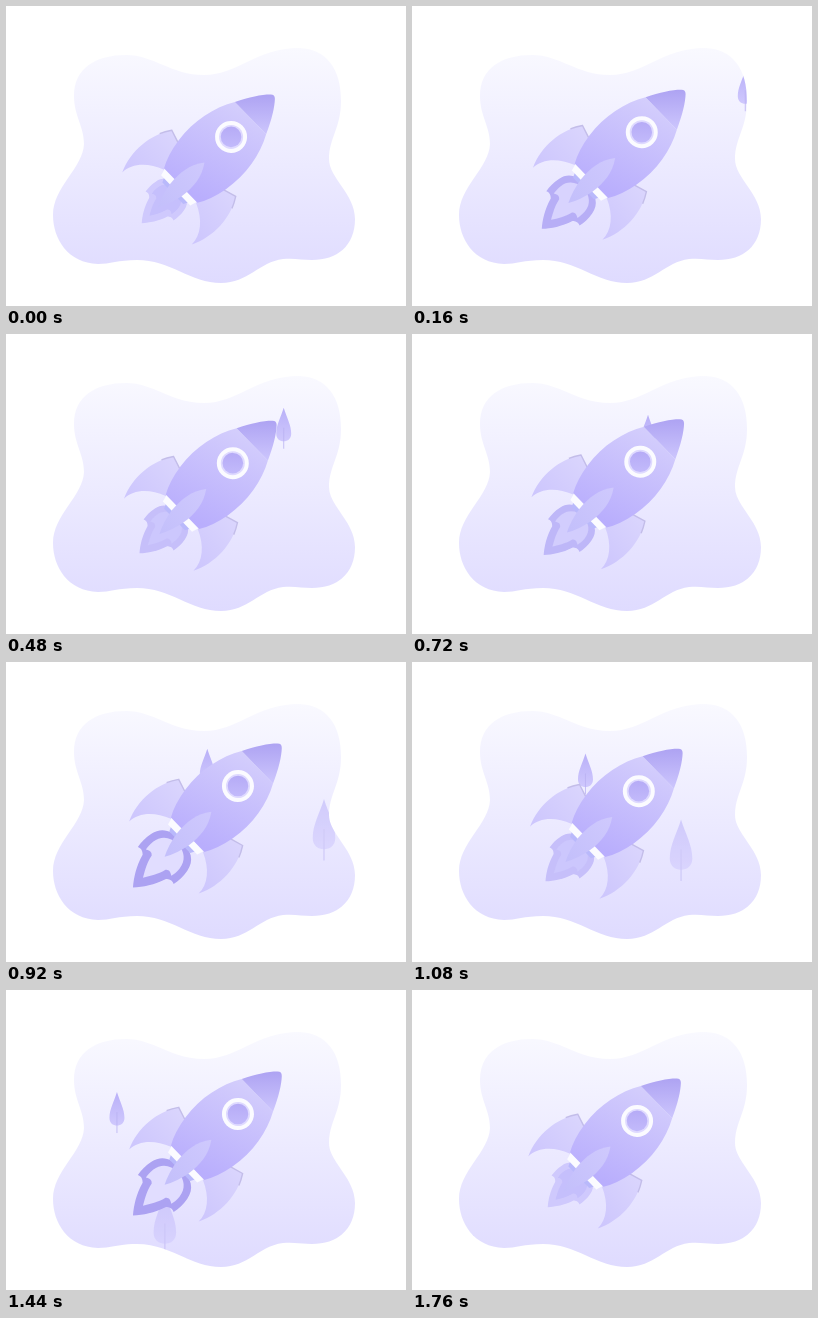
Write an HTML page that moves like this. It is 400 px wide and 300 px high and loops after 1.8 s.

```html
<!DOCTYPE html>
<html lang="en">
<head>
<meta charset="utf-8">
<title>Rocket</title>
<style>
  html, body { margin: 0; width: 100%; height: 100%; overflow: hidden; background: #fff; }
  svg { display: block; width: 100vw; height: 100vh; }
</style>
</head>
<body>
<svg viewBox="0 0 400 300">
  <defs>
    <linearGradient id="sky" x1="0" y1="0" x2="0" y2="1">
      <stop offset="0" stop-color="#f9f9ff"/><stop offset="1" stop-color="#dfdbff"/>
    </linearGradient>
    <linearGradient id="hull" gradientUnits="userSpaceOnUse" x1="-20" y1="-25" x2="14" y2="68">
      <stop offset="0" stop-color="#d3cdfc"/><stop offset="1" stop-color="#b9aefd"/>
    </linearGradient>
    <linearGradient id="cap" gradientUnits="userSpaceOnUse" x1="-8" y1="-56" x2="20" y2="-29">
      <stop offset="0" stop-color="#aca1f2"/><stop offset="1" stop-color="#cac3fc"/>
    </linearGradient>
    <linearGradient id="wing" x1="0" y1="0" x2="0" y2="1">
      <stop offset="0" stop-color="#dad5fd"/><stop offset="1" stop-color="#ccc5fd"/>
    </linearGradient>
    <linearGradient id="glass" x1="0" y1="0" x2="1" y2="1">
      <stop offset="0" stop-color="#b3a8f5"/><stop offset="1" stop-color="#c5bdfc"/>
    </linearGradient>
    <linearGradient id="keel" x1="0" y1="0" x2="0" y2="1">
      <stop offset="0" stop-color="#cfc9fd"/><stop offset="1" stop-color="#c3bffb"/>
    </linearGradient>
    <linearGradient id="foliage" x1="0" y1="0" x2="0" y2="1">
      <stop offset="0" stop-color="#b9b0f8"/><stop offset="1" stop-color="#cfc8fd"/>
    </linearGradient>
    <path id="cloud" d="M68 90C68 62 90 49 120 49C148 49 165 69 198 69C232 69 250 42 293 42
      C321 43 335 63 335 95C335 122 323 132 323 153C323 172 349 188 349 213
      C349 240 331 254 306 254C296 254 289 252 277 253C253 256 242 277 215 277
      C185 277 164 254 131 254C112 254 104 258 92 258C62 257 47 233 47 209
      C47 181 77 162 78 138C78 120 68 110 68 90Z"/>
    <clipPath id="inside"><use href="#cloud"/></clipPath>
    <g id="leaf">
      <path d="M0 0C3 10 7.5 17 7.5 26C7.5 31 4 33.5 0 33.5C-4 33.5 -7.5 31 -7.5 26C-7.5 17 -3 10 0 0Z" fill="url(#foliage)"/>
      <path d="M0 20V41" stroke="#bab2f2" stroke-width=".8"/>
    </g>
    <g id="fin">
      <path d="M32 42L46 38C58 56 60 82 50 103C50 90 40 78 23 71Z" fill="url(#wing)"/>
      <path d="M33 42L46 38Q50 44 52 49" fill="none" stroke="#c3bde9" stroke-width="1.4"/>
    </g>
  </defs>

  <use href="#cloud" fill="url(#sky)"/>
  <g clip-path="url(#inside)">
    <use id="far" href="#leaf" opacity=".55"/>
    <use id="near" href="#leaf"/>
  </g>

  <g id="rocket">
    <use href="#fin"/>
    <use href="#fin" transform="scale(-1 1)"/>
    <g id="flame">
      <path id="outer" d="M0 80C14 78 24 84 26 96C27.5 103 27 109 26 115C22 113 19 115 17 117
        C13 130 7 139 0 147C-7 139 -13 130 -17 117C-19 115 -22 113 -26 115
        C-27 109 -27.5 103 -26 96C-24 84 -14 78 0 80Z"/>
      <path id="inner" d="M0 84C10 84 18 90 19 100C19.5 104 19 108 18.5 111C14 108 12 109 10 111
        C8 120 4 126 0 133C-4 126 -8 120 -10 111C-12 109 -14 108 -18.5 111
        C-19 108 -19.5 104 -19 100C-18 90 -10 84 0 84Z"/>
    </g>
    <path d="M-18 75H18L15 81H-15Z" fill="#b9b9fb"/>
    <path d="M-23 70H23L21 77H-21Z" fill="#fbfbff"/>
    <path d="M-22.5 -27C-33 -9 -38 16 -34 40Q-31 58 -24 70H24Q31 58 34 40C38 16 33 -9 22.5 -27Z" fill="url(#hull)"/>
    <path d="M-22.5 -27C-16 -41 -9 -52 -3 -58Q0 -61 3 -58C9 -52 16 -41 22.5 -27Z" fill="url(#cap)"/>
    <circle r="16" fill="#fbfbff"/>
    <circle r="12" fill="#dfdaff"/>
    <circle r="10.3" fill="url(#glass)"/>
    <path d="M0 37C9 49 10 62 8.500 76Q6 91 0 102Q-6 91 -8.500 76C-10 62 -9 49 0 37Z" fill="url(#keel)"/>
  </g>
</svg>
<script>
  const LOOP = 1800, STEP = 40, BEAT = 600;
  const el = id => document.getElementById(id);
  const place = (id, value) => el(id).setAttribute('transform', value);
  const mix = (a, b, k) => `rgb(${a.map((v, i) => Math.round(v + (b[i] - v) * k))})`;

  function draw(t) {
    // One thrust per beat: 0 is at rest, 1 is full power.
    const k = (1 - Math.cos(2 * Math.PI * (t + 20) / BEAT)) / 2;
    const shift = 7.3 * k;
    place('rocket', `translate(${225 + shift} ${131 - shift}) rotate(46)`);
    place('flame', `translate(0 47) scale(${0.77 + 0.23 * k}) translate(0 -47)`);
    el('outer').setAttribute('fill', mix([207, 201, 253], [170, 160, 242], k));
    el('inner').setAttribute('fill', mix([197, 191, 252], [226, 222, 255], k));

    place('near', `translate(${305.5 - 0.1737 * (t - 320)} ${69 + 0.0295 * (t - 320)})`);
    place('far', `translate(${318 - 0.306 * (t - 920)} ${137 + 0.128 * (t - 920)}) scale(1.5)`);
  }

  const start = performance.now();
  function tick() {
    const t = (performance.now() - start) % LOOP;
    draw(Math.floor(t / STEP) * STEP);
    requestAnimationFrame(tick);
  }
  tick();
</script>
</body>
</html>
```
